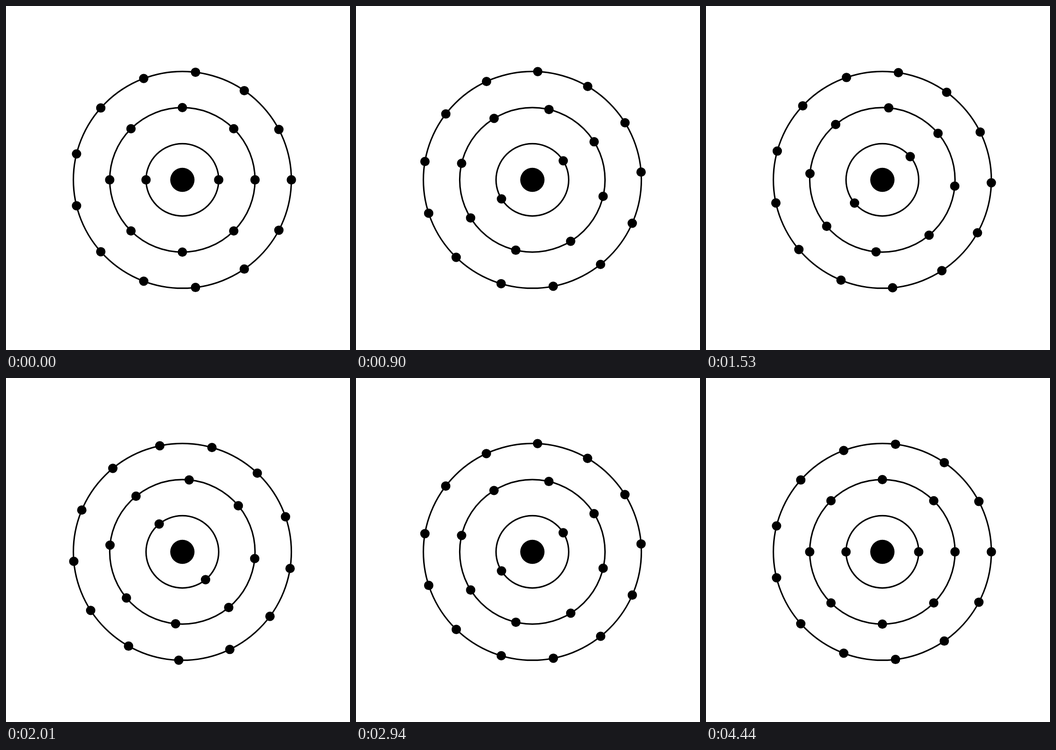
An HTML page with a canvas that plays this animation: 748x748 px, repeating every 4.5 s.

```html
<!DOCTYPE html>
<html lang="en">
<head>
<meta charset="utf-8">
<title>Electron shells</title>
<style>
  html, body { margin: 0; width: 100%; height: 100%; overflow: hidden; background: #fff; }
  canvas { display: block; }
</style>
</head>
<body>
<canvas id="stage" width="748" height="748"></canvas>
<script>
const ctx = document.getElementById("stage").getContext("2d");
const LOOP = 4500, STEP = 30, TURNS = 2, PEAK = 0.03;
const CX = 383.5, CY = 378, SQUASH = 0.9945;
const SHELLS = [
  { radius: 79, electrons: 2 },
  { radius: 158, electrons: 8 },
  { radius: 237, electrons: 13 }
];

// Cubic ease in and out, fastest at PEAK.
function ease(t) {
  return t < PEAK ? t ** 3 / PEAK ** 2 : 1 - (1 - t) ** 3 / (1 - PEAK) ** 2;
}

function oval(x, y, radius) {
  ctx.beginPath();
  ctx.ellipse(x, y, radius, radius * SQUASH, 0, 0, 2 * Math.PI);
}

function disc(x, y, radius) {
  oval(x, y, radius);
  ctx.fill();
}

function draw(time) {
  const t = Math.floor((time % LOOP) / STEP) * STEP / LOOP;
  const spin = TURNS * 2 * Math.PI * ease(t);

  ctx.fillStyle = "#fff";
  ctx.fillRect(0, 0, 748, 748);
  ctx.fillStyle = ctx.strokeStyle = "#000";
  ctx.lineWidth = 3.2;
  disc(CX, CY, 26.4);

  for (const { radius, electrons } of SHELLS) {
    oval(CX, CY, radius);
    ctx.stroke();
    for (let i = 0; i < electrons; i++) {
      const angle = spin + 2 * Math.PI * i / electrons;
      disc(CX + radius * Math.cos(angle), CY + radius * SQUASH * Math.sin(angle), 10.2);
    }
  }
}

const start = performance.now();
function tick() {
  draw(performance.now() - start);
  requestAnimationFrame(tick);
}
tick();
</script>
</body>
</html>
```
